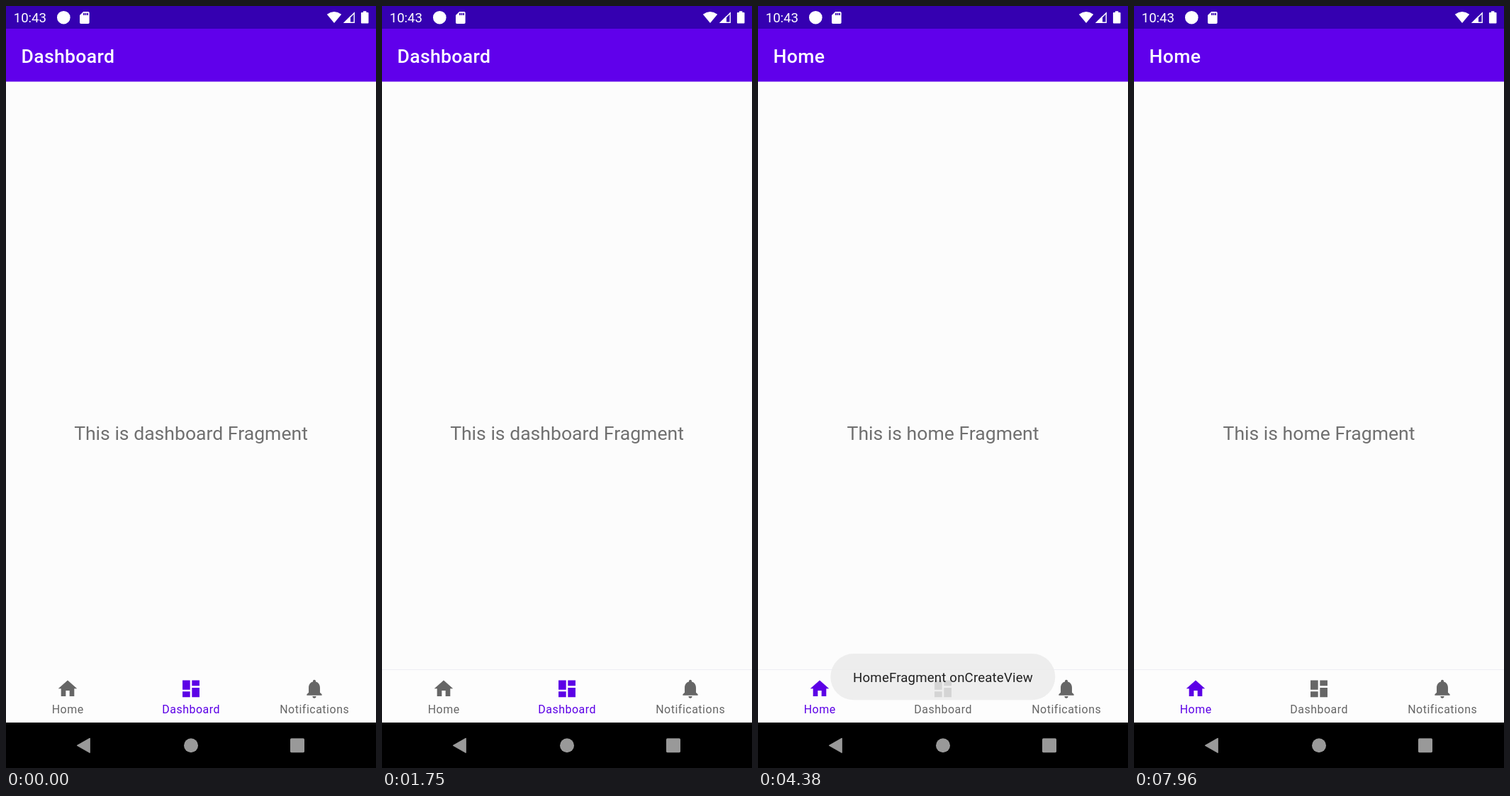
These frames come from a looping animation (522x1073 px, 8000 ms). An HTML page:

```html
<!DOCTYPE html>
<html lang="en">
<head>
<meta charset="utf-8">
<title>Bottom navigation</title>
<style>
  html, body { margin: 0; width: 100%; height: 100%; overflow: hidden; background: #fcfcfc; }
  svg { display: block; width: 522px; height: 1073px; font-family: Roboto, sans-serif; }
  .title { font-size: 26.58px; font-weight: 500; letter-spacing: .0125em; fill: #fff; }
  .body { font-size: 26.58px; fill: #707070; text-anchor: middle; }
  .tab { fill: #666; }
  .tab text { font-size: 15.95px; letter-spacing: .0333em; text-anchor: middle; }
  .toast text { font-size: 18.61px; letter-spacing: .01em; text-anchor: middle; fill: #161616; }
  .ripple { transform-origin: 87px 972px; opacity: 0; }
  #home-page, .toast { opacity: 0; }
</style>
</head>
<body>
<svg viewBox="0 0 522 1073">
  <defs>
    <clipPath id="bar"><rect y="935" width="522" height="74"/></clipPath>
  </defs>
  <rect width="522" height="1073" fill="#fcfcfc"/>
  <rect y="31" width="522" height="75.5" fill="#6000eb"/>
  <rect width="522" height="32" fill="#3500b1"/>

  <!-- status bar -->
  <g fill="#fff">
    <text x="10.7" y="23.4" font-size="18.6">10:43</text>
    <circle cx="81.3" cy="16.2" r="9.3"/>
    <path transform="translate(100.6 6.3) scale(.85)" d="M18 2h-8L4 8v12c0 1.1.9 2 2 2h12c1.1 0 2-.9 2-2V4c0-1.1-.9-2-2-2zm-6 6h-2V4h2zm3 0h-2V4h2zm3 0h-2V4h2z"/>
    <path d="M463 24 452.8 11.7Q463 4.3 473.2 11.7Z"/>
    <path d="M476 24 486 14V24Z"/>
    <path d="M477.8 23.3 491.2 9.9V23.3Z" fill="none" stroke="#fff" stroke-width="1.4"/>
    <path d="M504 7.3h4.4v1.8h2.1q1 0 1 1v13.4q0 1-1 1h-8.6q-1 0-1-1V10.1q0-1 1-1h2.1z"/>
  </g>

  <g id="dash-page">
    <text class="title" x="21.5" y="79.7">Dashboard</text>
    <text class="body" x="261" y="611">This is dashboard Fragment</text>
  </g>
  <g id="home-page">
    <text class="title" x="21.5" y="79.7">Home</text>
    <text class="body" x="261" y="611">This is home Fragment</text>
  </g>

  <!-- bottom navigation -->
  <rect y="935" width="522" height="74" fill="#fdfdfd"/>
  <rect id="edge" y="934" width="522" height="1" fill="#ededf3"/>
  <g clip-path="url(#bar)">
    <circle class="ripple" id="grey" cx="87" cy="972" r="94.5" fill="#000"/>
    <circle class="ripple" id="violet" cx="87" cy="972" r="94.5" fill="#6200ee"/>
  </g>
  <g class="tab" id="home-tab">
    <path transform="translate(71.05 945.4) scale(1.329)" d="M10 20v-6h4v6h5v-8h3L12 3 2 12h3v8z"/>
    <text x="87.2" y="995.7">Home</text>
  </g>
  <g class="tab" id="dash-tab">
    <path transform="translate(245.05 945.4) scale(1.329)" d="M3 13h8V3H3zM3 21h8v-6H3zM13 21h8V11h-8zM13 3v6h8V3z"/>
    <text x="261.2" y="995.7">Dashboard</text>
  </g>
  <g class="tab">
    <path transform="translate(419.05 945.4) scale(1.329)" d="M12 22c1.1 0 2-.9 2-2h-4c0 1.1.9 2 2 2zM18 16v-5c0-3.07-1.64-5.64-4.5-6.32V4c0-.83-.67-1.5-1.5-1.5s-1.5.67-1.5 1.5v.68C7.63 5.36 6 7.92 6 11v5l-2 2v1h16v-1z"/>
    <text x="435.2" y="995.7">Notifications</text>
  </g>

  <!-- system navigation -->
  <rect y="1009" width="522" height="64" fill="#000"/>
  <g fill="#999">
    <path d="M100.2 1041.3 118.3 1031V1051.6Z" stroke="#999" stroke-width="1" stroke-linejoin="round"/>
    <circle cx="261" cy="1041.2" r="10"/>
    <rect x="401" y="1031.2" width="20" height="20" rx="1.6"/>
  </g>

  <g class="toast">
    <rect x="102.3" y="912" width="317" height="65.3" rx="32.6" fill="#ebebeb" fill-opacity=".88"/>
    <text x="261" y="952">HomeFragment onCreateView</text>
  </g>
</svg>
<script>
const LOOP = 8000, HOLD = 'steps(1, end)';
const QUAD_OUT = 'cubic-bezier(.3333, .6667, .6667, 1)';
const QUAD_IN = 'cubic-bezier(.3333, 0, .6667, .3333)';
const VIOLET = '#5c00e6', GREY = '#666';
const PAGE_SWITCH = 2400;

// steps: [ms, value, easing towards the next step]
function play(selector, prop, steps) {
  const frames = [...steps, [LOOP, steps[steps.length - 1][1]]].map(([ms, value, easing = 'linear']) =>
    ({ offset: ms / LOOP, [prop]: value, easing }));
  const anim = document.querySelector(selector).animate(frames, { duration: LOOP, iterations: Infinity });
  anim.startTime = 0;
}

function swap(selector, prop, before, after, ms) {
  play(selector, prop, [[0, before, HOLD], [ms, after]]);
}

function ripple(selector, press, release, alpha) {
  play(selector, 'opacity', [[0, 0, HOLD], [press, 0], [press + 75, alpha], [release, alpha], [release + 150, 0]]);
  play(selector, 'transform', [[0, 'scale(0)', HOLD], [press, 'scale(0)', QUAD_OUT], [press + 225, 'scale(1)']]);
}

function toasts(selector, times) {
  const steps = [[0, 0]];
  for (const [show, hide] of times)
    steps.push([show, 0, QUAD_OUT], [show + 500, 1], [hide, 1, QUAD_IN], [hide + 500, 0]);
  play(selector, 'opacity', steps);
}

swap('#dash-page', 'opacity', 1, 0, PAGE_SWITCH);
swap('#home-page', 'opacity', 0, 1, PAGE_SWITCH);
swap('#dash-tab', 'fill', VIOLET, GREY, PAGE_SWITCH);
swap('#home-tab', 'fill', GREY, VIOLET, PAGE_SWITCH);
swap('#edge', 'opacity', 0, 1, 460);
ripple('#grey', 2260, 2465, .12);
ripple('#violet', 5180, 5405, .19);
toasts('.toast', [[2430, 4270], [5367, 7207]]);
</script>
</body>
</html>
```
